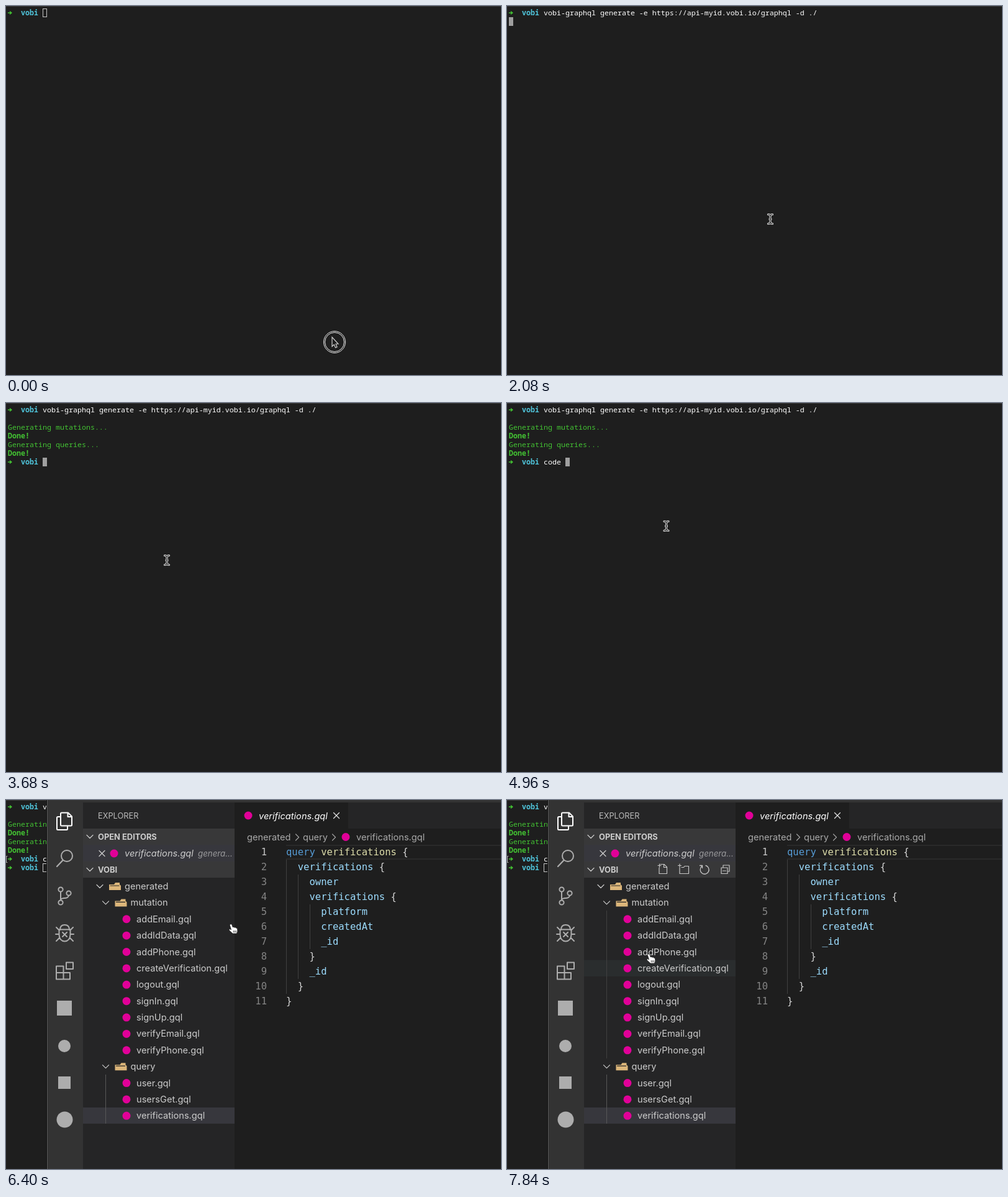
Write an HTML page that moves like this. It is 797x594 px and loops after 8000 ms.

```html
<!DOCTYPE html>
<html lang="en">
<head>
<meta charset="utf-8">
<title>Terminal session</title>
<style>
html, body { margin: 0; width: 100%; height: 100%; overflow: hidden; background: #1e1e1e; }
svg { display: block; }
text { white-space: pre; }
.term { font: 11.667px "Noto Sans Mono", monospace; }
.code { font: 15.56px "DejaVu Sans Mono", monospace; }
.ui { font: 14.6px Inter, sans-serif; }
.bold { font-weight: 700; }
.line { fill: none; stroke-linecap: round; stroke-linejoin: round; }
</style>
</head>
<body>
<svg id="stage" width="797" height="594" viewBox="0 0 797 594"></svg>
<script>
const LOOP = 8000;
const GREEN = '#43c333', CYAN = '#4fc3d9', GREY = '#adadad', PINK = '#e10098';
const COMMAND = 'vobi-graphql generate -e https://api-myid.vobi.io/graphql -d ./';
const stage = document.getElementById('stage');
const timed = [];

function add(parent, name, attrs = {}, text = '') {
  const el = document.createElementNS('http://www.w3.org/2000/svg', name);
  for (const key in attrs) el.setAttribute(key, attrs[key]);
  el.textContent = text;
  parent.append(el);
  return el;
}
const group = parent => add(parent, 'g');
const rect = (parent, x, y, width, height, fill) => add(parent, 'rect', { x, y, width, height, fill });
const dot = (parent, cx, cy, r, fill) => add(parent, 'circle', { cx, cy, r, fill });
const line = (parent, d, stroke, width = 1) =>
  add(parent, 'path', { d, stroke, 'stroke-width': width, class: 'line' });
const label = (parent, x, y, text, fill, cls = 'ui', size, italic) => {
  const el = add(parent, 'text', { x, y, fill, class: cls }, text);
  if (size) el.style.fontSize = size + 'px';
  if (italic) el.style.fontStyle = 'italic';
  return el;
};
const during = (el, from, to = LOOP) => { timed.push({ el, from, to }); return el; };
const at = (steps, t) => steps.findLast(step => step[0] <= t);

// Terminal
const term = group(stage);
rect(term, 0, 0, 797, 594, '#1e1e1e');
rect(term, 0, 0, 797, 1, '#3b3b3b');
const block = rect(term, 0, 0, 7, 14, '#9f9f9f');
const hollow = add(term, 'rect', { width: 6, height: 13, fill: 'none', stroke: '#c4c4c4' });
const cell = (parent, col, row, text, fill, bold) =>
  label(parent, 3 + col * 7, 15 + row * 14, text, fill, bold ? 'term bold' : 'term');

function prompt(row, from) {
  const g = during(group(term), from);
  const y = 11 + row * 14;
  line(g, `M3.5 ${y}h5M6.5 ${y - 2}l2.5 2l-2.5 2`, GREEN, 1.5);
  cell(g, 3, row, 'vobi', CYAN, true);
}
prompt(0, 0);
prompt(6, 3680);
prompt(7, 5760);

const typed = cell(term, 8, 0, '', '#fff');
const hint = cell(term, 8, 0, '', '#686868');
const open = cell(term, 8, 6, '', '#fff');
[['Generating mutations...', 3360], ['Done!', 3520], ['Generating queries...', 3520], ['Done!', 3680]]
  .forEach(([text, from], i) => during(cell(term, 0, i + 2, text, GREEN, i % 2), from));
during(line(term, 'M2 90.5H.5V100.5H2', '#a8a8a8'), 5760);

// time, column, row, hollow
const cursorSteps = [
  [0, 8, 0, true], [320, 8, 0], [640, 9, 0], [800, 10, 0], [2080, 0, 1], [2880, 0, 2],
  [3360, 0, 3], [3520, 0, 5], [3680, 8, 6], [4480, 9, 6], [4640, 10, 6], [4800, 11, 6],
  [4960, 13, 6], [5280, 14, 6], [5760, 8, 7], [6400, 8, 7, true]
];

// Editor window
const win = during(group(stage), 6400);
rect(win, 66, 0, 731, 594, '#1e1e1e');
rect(win, 65, 0, 1, 594, '#111');
rect(win, 66, 0, 1, 594, '#5a5a5a');
rect(win, 67, 0, 57, 594, '#333');
rect(win, 124, 0, 244, 594, '#252526');
rect(win, 551, 4, 246, 42, '#252526');
rect(win, 67, 0, 730, 4, '#333');

// Activity bar
line(win, 'M88 27V22Q88 20.500 89.500 20.500H100L106 26.500V40Q106 41.500 104.500 41.500H89.500Q88 41.500 88 40V27M99.500 21V27H106M87.500 27H83.500Q82 27 82 28.500V46.500Q82 48 83.500 48H97.500Q99 48 99 46.500V42', '#fff', 2);
add(win, 'circle', { cx: 98, cy: 90, r: 9, fill: 'none', stroke: GREY, 'stroke-width': 2 });
line(win, 'M91.500 97L82 107', GREY, 2.2);
for (const [cx, cy] of [[88, 144], [88, 165], [101, 150]])
  add(win, 'circle', { cx, cy, r: 3.6, fill: 'none', stroke: GREY, 'stroke-width': 2 });
line(win, 'M88 148V161M101 154Q100 158 94 158Q89 158 88 161', GREY, 2);
line(win, 'M87 209Q87 201 94.500 201Q102 201 102 209M85.500 208.500H103.500V217Q103 227 94.500 227.500Q86 227 85.500 217ZM85 209L81 205M104 209L108 205M85 216H80M104 216H109M86 222L81 227M103 222L108 227M91 213L98 220M98 213L91 220', GREY, 2);
line(win, 'M81 267.500H92.500V288.500H81ZM81 278H103V288.500H92.500M97 261.500H108V272H97Z', GREY, 2);
rect(win, 82, 323, 24, 24, GREY);
dot(win, 94, 396, 10, GREY);
rect(win, 84, 445, 20, 20, GREY);
dot(win, 94.5, 514.5, 13, GREY);

// Explorer
const TEXT = '#cccccc';
const chevron = (x, y) => line(win, `M${x - 5} ${y - 2.5}l5 5l5-5`, TEXT, 1.2);
const arrow = (x, y) => line(win, `M${x - 2.5} ${y - 5}l5 5l-5 5`, '#a0a0a0', 1.2);
const cross = (x, y, color) => line(win, `M${x - 4.5} ${y - 4.5}l9 9m0-9l-9 9`, color, 1.3);
const fileIcon = (x, y) => dot(win, x, y, 6.5, PINK);
const rowY = i => 139 + i * 26.38;

label(win, 148, 30, 'EXPLORER', '#bbbbbb', 'ui', 12.8);
rect(win, 124, 46, 244, 26, '#383839');
rect(win, 124, 72, 244, 27, '#37373d');
rect(win, 124, 99, 244, 26, '#383839');
chevron(135, 59);
label(win, 148, 64, 'OPEN EDITORS', TEXT, 'ui bold', 12.9);
cross(154.5, 86, TEXT);
fileIcon(174, 86);
label(win, 191, 91, 'verifications.gql', TEXT, 'ui', 14.6, true);
label(win, 309, 91, 'genera...', '#9a9a9c', 'ui', 13.3, true);
chevron(135, 112);
label(win, 148, 117, 'VOBI', TEXT, 'ui bold', 12.9);

rect(win, 124, 495, 244, 26, '#37373d');
const hover = rect(win, 124, 0, 244, 26.4, '#2a2d2e');
rect(win, 160, 442, 1, 79, '#585858');

function folder(i, x, name) {
  const y = rowY(i);
  chevron(x, y);
  add(win, 'path', {
    d: `M${x + 15} ${y + 6}V${y - 3}h8l2-3h7v3l2 2v7z`, fill: '#dcb67a'
  });
  line(win, `M${x + 17} ${y - 1}h14`, '#252526', 1.2);
  label(win, x + 40, y + 5, name, TEXT);
}
folder(0, 151, 'generated');
folder(1, 160.5, 'mutation');
folder(11, 160.5, 'query');
['addEmail', 'addIdData', 'addPhone', 'createVerification', 'logout', 'signIn', 'signUp',
  'verifyEmail', 'verifyPhone', '', 'user', 'usersGet', 'verifications'].forEach((name, i) => {
  if (!name) return;
  const y = rowY(i + 2);
  fileIcon(194, y);
  label(win, 210, y + 5, name + '.gql', TEXT);
});

const hoverUi = during(group(win), 6880);
rect(hoverUi, 160, 178, 1, 238, '#404040');
line(hoverUi, 'M245 109V118.500H257.500V108L253 103.500H247M252.500 104V108.500H257M243 105.500H248M245.500 103V108', '#c5c5c5', 1.2);
line(hoverUi, 'M278 109V118.500H292.500V106.500H286L284.500 108.500H281M275.500 105.500H280.500M278 103V108', '#c5c5c5', 1.2);
line(hoverUi, 'M313.500 107A7 7 0 1 0 320 105.500M310.500 105.500H314.500V109.500', '#c5c5c5', 1.3);
line(hoverUi, 'M345 109H355V118.500H345ZM348 108.500V105H358V115H355.500M347.500 114H352.500', '#c5c5c5', 1.2);

// Code pane
fileIcon(390, 25);
label(win, 407, 30.5, 'verifications.gql', '#fff', 'ui', 14.6, true);
cross(532, 25, '#e0e0e0');
label(win, 388, 65, 'generated', '#a9a9a9');
arrow(469, 60);
label(win, 478, 65, 'query', '#a9a9a9');
arrow(528, 60);
fileIcon(547, 59.5);
label(win, 564, 65, 'verifications.gql', '#a9a9a9');
rect(win, 451, 72, 346, 2, '#2a2a2a');
rect(win, 451, 94, 346, 2, '#2a2a2a');
for (const [x, y, h] of [[451, 96, 216], [470, 120, 168], [489, 168, 72]])
  rect(win, x, y, 1, h, '#404040');

const code = ['query verifications {', '  verifications {', '    owner', '    verifications {',
  '      platform', '      createdAt', '      _id', '    }', '    _id', '  }', '}'];
code.forEach((source, i) => {
  const y = 89 + i * 24;
  label(win, 420, y, i + 1, i ? '#858585' : '#c6c6c6', 'code').setAttribute('text-anchor', 'end');
  const row = label(win, 451, y, '', '#d4d4d4', 'code');
  source.split(/(\w+)/).forEach((part, k) => {
    let fill = '#d4d4d4';
    if (/\w/.test(part)) fill = i ? '#9cdcfe' : k === 1 ? '#569cd6' : '#dcdcaa';
    add(row, 'tspan', { fill }, part);
  });
});

// Pointers, each centred on its own origin
const pointers = { ring: group(stage), beam: group(stage), hand: group(stage) };
for (const r of [17.5, 15.5])
  add(pointers.ring, 'circle', { r, fill: '#1e1e1e', stroke: '#eee' });
add(pointers.ring, 'path', {
  d: 'M-4-8V7L-.8 4L1.500 9L4 8L2 3H6Z', fill: '#1c1c1c', stroke: '#d0d0d0', 'stroke-width': 1.2
});
const beam = 'M-3.500-7.500Q0-7.500 0-4.500Q0-7.500 3.500-7.500M0-5V5M-3.500 7.500Q0 7.500 0 4.500Q0 7.500 3.500 7.500M-1 0H1';
line(pointers.beam, beam, '#e6e6e6', 3.2);
line(pointers.beam, beam, '#1e1e1e', 1.2);
add(pointers.hand, 'path', {
  d: 'M-4.500-7q1.700-.8 2.200.8l1.500 4q2-.9 2.700.5q2-.6 2.600.8q2-.1 2.100 1.800l.2 3.200l-1.300 3.900h-6.500l-5.400-5q-1.200-2 .7-2.300l2.200 1l-2.200-7q0-1.400 1.200-1.700z',
  fill: '#fff', stroke: '#222', 'stroke-width': .8
});
line(pointers.hand, 'M.3 3.500V6M2.300 3.500V6M4.300 3.500V6', '#222', .8);

// time, pointer, x, y, hovered row
const pointerSteps = [
  [0, 'ring', 529, 541], [160, 'beam', 478, 430], [320, 'beam', 438, 336], [640, 'beam', 430, 340],
  [800, 'beam', 424, 343], [3360, 'beam', 395, 399], [3520, 'beam', 305, 330],
  [3680, 'beam', 259, 253], [3840, 'beam', 256.5, 198], [6080, 'beam', 300, 199],
  [6240, 'beam', 364, 199], [6400, 'hand', 366, 207], [6880, 'hand', 330, 225, 3],
  [7040, 'hand', 285, 245, 4], [7200, 'hand', 250, 262, 5], [7360, 'hand', 236, 270, 5],
  [7680, 'hand', 233, 262, 5], [7840, 'hand', 232, 255, 5]
];

function draw(t) {
  for (const { el, from, to } of timed)
    el.style.display = t >= from && t < to ? '' : 'none';

  const [, col, row, empty] = at(cursorSteps, t);
  block.style.display = empty ? 'none' : '';
  hollow.style.display = empty ? '' : 'none';
  const x = 3 + col * 7, y = 4 + row * 14;
  block.setAttribute('transform', `translate(${x} ${y})`);
  hollow.setAttribute('transform', `translate(${x + .5} ${y + .5})`);

  const count = t < 640 ? 0 : t < 2080 ? col - 8 : COMMAND.length;
  typed.textContent = COMMAND.slice(0, count);
  hint.textContent = count ? COMMAND.slice(count) : '';
  hint.setAttribute('x', 59 + count * 7);
  open.textContent = 'code .'.slice(0, t < 4480 ? 0 : t < 5760 ? col - 8 : 6);

  const [, kind, px, py, over] = at(pointerSteps, t);
  for (const name in pointers) pointers[name].style.display = name === kind ? '' : 'none';
  pointers[kind].setAttribute('transform', `translate(${px} ${py})`);
  hover.style.display = over ? '' : 'none';
  if (over) hover.setAttribute('y', rowY(over) - 13.2);
}

const start = performance.now();
function tick() {
  draw((performance.now() - start) % LOOP);
  requestAnimationFrame(tick);
}
tick();
</script>
</body>
</html>
```
